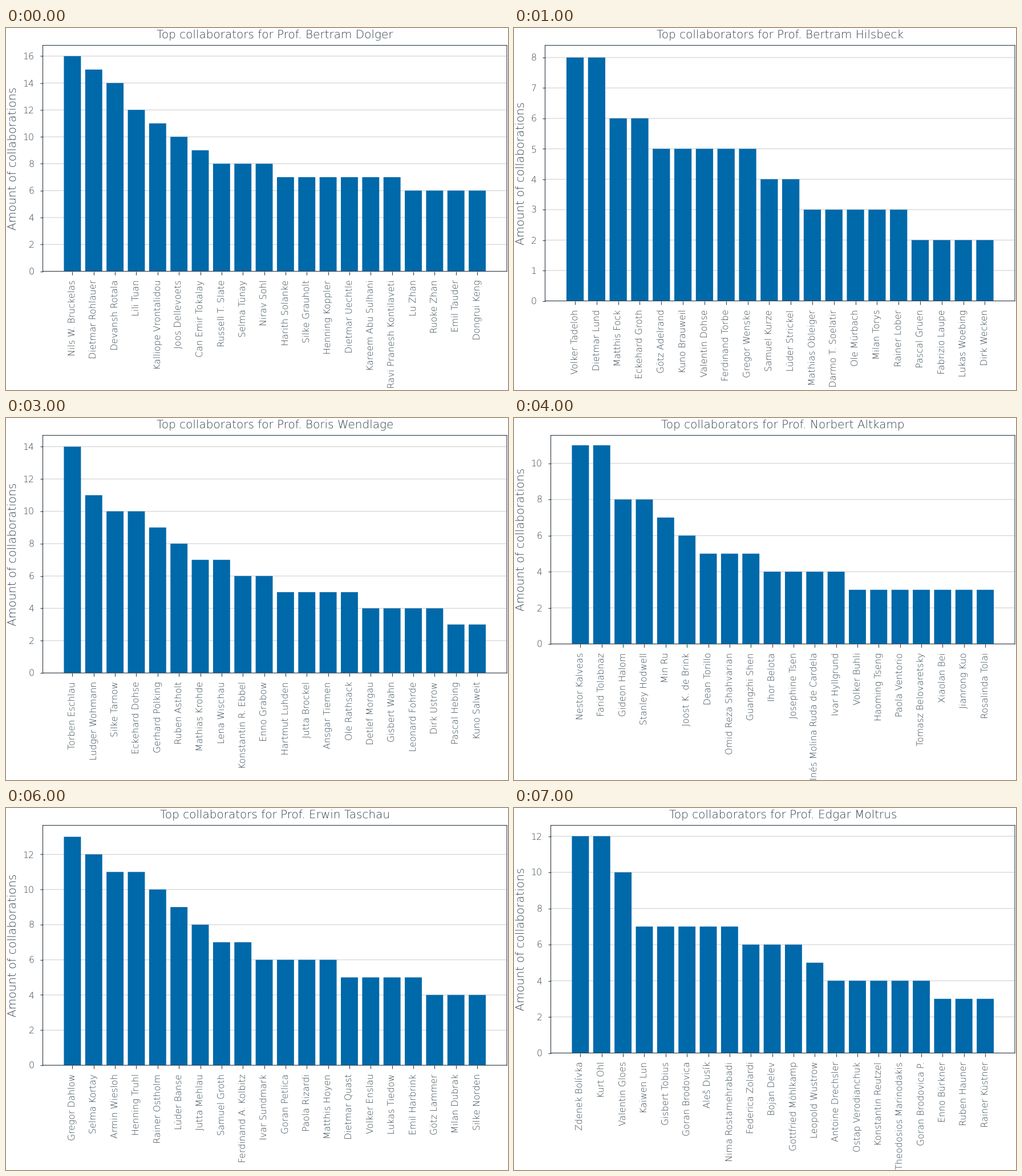
Recreate the animation shown at these times as a matplotlib script. Size 880 px wide and 636 px high, loop 8000 ms.

```python
import matplotlib.pyplot as plt
import numpy as np
from matplotlib.animation import FuncAnimation

W, H, DPI = 880, 636, 80
PX = 72 / DPI  # points per pixel
DARK, BLUE, GRID = "#32414b", "#0069aa", "#d2d2d2"
TOP, RIGHT = 30.5, 878
LINE, SMALL, LARGE = 1.15 * PX, 15.7 * PX, 20 * PX

plt.rcParams.update({
    "font.family": "DejaVu Sans",
    "font.weight": 200,
    "text.color": DARK,
    "text.hinting": "none",
    "path.snap": False,
    "axes.edgecolor": DARK,
    "axes.linewidth": LINE,
    "xtick.color": DARK,
    "ytick.color": DARK,
})

# professor, bottom edge, (rank, value) points of the falling curve, names
CHARTS = [
    ("Bertram Dolger", 427.5,
     [(0, 15.9), (7, 7.9), (19, 5.9)],
     "Nils W. Bruckelas, Dietmar Rohlauer, Devansh Rotala, Lili Tuan, "
     "Kalliope Vrontalidou, Joos Dellevoets, Can Emir Tokalay, "
     "Russell T. Slate, Selma Tünay, Nirav Sohl, Harith Solanke, "
     "Silke Grauholt, Henning Koppler, Dietmar Uechtle, "
     "Kareem Abu Sulhani, Ravi Pranesh Kontilaveti, Lu Zhan, "
     "Ruoke Zhan, Emil Tauder, Dongrui Keng"),
    ("Bertram Hilsbeck", 479.5,
     [(1, 8), (2, 5.8), (8, 4.55), (11, 3.4), (19, 1.8)],
     "Volker Tadeloh, Dietmar Lund, Matthis Fock, Eckehard Groth, "
     "Götz Adelrand, Kuno Brauweil, Valentin Dohse, Ferdinand Torbe, "
     "Gregor Wenske, Samuel Kurze, Lüder Strickel, Mathias Obleiger, "
     "Darmo T. Soelatir, Ole Mürbach, Milan Torys, Rainer Lober, "
     "Pascal Gruen, Fabrizio Laupe, Lukas Woebing, Dirk Wecken"),
    ("Bertram Tilk", 456,
     [(0, 27), (1, 25), (2, 18.4), (5, 16.6), (6, 15.2), (13, 11.2)],
     "Armin Brechholt, Hartmut Sprohde, Bertram Kräwel, Lena Stohr, "
     "Gerhard Lunten, Bertram Lohn, Edgar Rinkelstedt, Detlef Tubber, "
     "Ansgar Olber, Lukas Dobbe, Valentin Ehde, Hartmut Grauss, "
     "Leonard Zechter, Valentin Dusk, Valentin O. Brondner, "
     "Ludger Kranatinger, Bertram Tossetti, Pascal Grünfels, "
     "Gregor Harst, Ansgar Mürbach"),
    ("Boris Wendlage", 448,
     [(0, 14), (1, 11), (8, 6), (19, 3)],
     "Torben Eschlau, Ludger Wohmann, Silke Tarnow, Eckehard Dohse, "
     "Gerhard Pölking, Ruben Astholt, Mathias Krohde, Lena Wischau, "
     "Konstantin R. Ebbel, Enno Grabow, Hartmut Luhden, Jutta Brockel, "
     "Ansgar Tiemen, Ole Rathsack, Detlef Morgau, Gisbert Wahn, "
     "Leonard Fohrde, Dirk Ustrow, Pascal Hebing, Kuno Salweit"),
    ("Norbert Altkamp", 397,
     [(1, 11), (2, 8.3), (6, 5.3), (13, 3.3)],
     "Nestor Kalveas, Farid Tolabnaz, Gideon Halom, Stanley Hodwell, "
     "Min Ru, Joost K. de Brink, Dean Torillo, Omid Reza Shahvarian, "
     "Guangzhi Shen, Ihor Belota, Josephine Tsen, "
     "Inés Molina Ruda de Cardela, Ivar Hyllgrund, Volker Buhli, "
     "Haoming Tseng, Paola Ventorio, Tomasz Belovaretsky, Xiaolan Bei, "
     "Jianrong Kuo, Rosalinda Tolai"),
    ("Valmirela Torneci", 459.5,
     [(0, 64), (1, 30), (2, 26), (3, 25), (4, 19.6), (8, 14.2),
      (9, 8.6), (13, 7.4), (19, 6.2)],
     "Burkhard Rohl, Joachim E. Dübner, Burkhard Birkenthal, "
     "Renato Bellardi, Lena Hobrecht, Simon Tressler, Besjon Torneci, "
     "Alp Tozhan, Rui Dong, Rainer Wiljes, Ludwig Brandhain, "
     "Burghard Reher, Ling Bao, Ünal Sönel, Mathias Ubbel, Simeon Drexl, "
     "Joachim Strohbeck, Leonhard Wesp, Owen Gregory Shiel, "
     "Valmirela Tusha"),
    ("Erwin Taschau", 452,
     [(0, 13), (8, 6.6), (19, 4)],
     "Gregor Dahlow, Selma Kortay, Armin Wiesloh, Henning Truhl, "
     "Rainer Ostholm, Lüder Banse, Jutta Mehlau, Samuel Groth, "
     "Ferdinand A. Kolbitz, Ivar Sundmark, Goran Petlica, Paola Rizardi, "
     "Matthis Hoyen, Dietmar Quast, Volker Enslau, Lukas Tiedow, "
     "Emil Harbrink, Götz Lammer, Milan Dubrak, Silke Norden"),
    ("Edgar Moltrus", 430.5,
     [(1, 12), (2, 10), (3, 7.4), (10, 5.9), (12, 4.4), (19, 3)],
     "Zdenek Bolívka, Kurt Ohl, Valentin Gloes, Kaiwen Lun, "
     "Gisbert Tobius, Goran Brodovica, Aleš Dusík, Nima Rostamehrabadi, "
     "Federica Zolardi, Bojan Delev, Gottfried Möhlkamp, "
     "Leopold Wustrow, Antoine Drechsler, Ostap Verodianchuk, "
     "Konstantin Reutzel, Theodosios Marinodakis, Goran Brodovica P., "
     "Enno Bürkner, Ruben Hauner, Rainer Küstner"),
]

fig = plt.figure(figsize=(W / DPI, H / DPI), dpi=DPI, facecolor="white")


def label(x, y, text, **style):
    fig.text(x / W, 1 - y / H, text, size=LARGE, ha="center",
             va="baseline", rotation_mode="anchor", **style)


def draw(frame):
    prof, bottom, points, names = CHARTS[frame]
    names = names.split(", ")
    ranks = np.arange(len(names))
    values = np.rint(np.interp(ranks, *zip(*points)))
    left = 64.5 if values[0] >= 10 else 54.5  # room for two digits

    fig.clear()
    ax = fig.add_axes([left / W, 1 - bottom / H,
                       (RIGHT - left) / W, (bottom - TOP) / H])
    ax.set_axisbelow(True)
    ax.grid(axis="y", color=GRID, linewidth=LINE)
    ax.bar(ranks, values, width=0.8, color=BLUE)
    ax.set_ylim(0, values[0] * 1.05)
    ax.set_xticks(ranks, names, rotation=90)
    ax.tick_params(labelsize=SMALL, length=5.5 * PX, width=LINE,
                   pad=9.5 * PX)
    label((left + RIGHT) / 2, 18, f"Top collaborators for Prof. {prof}")
    label(18, (TOP + bottom) / 2, "Amount of collaborations", rotation=90)


anim = FuncAnimation(fig, draw, frames=len(CHARTS), init_func=lambda: None,
                     interval=1000, repeat=True)
plt.show()
```
